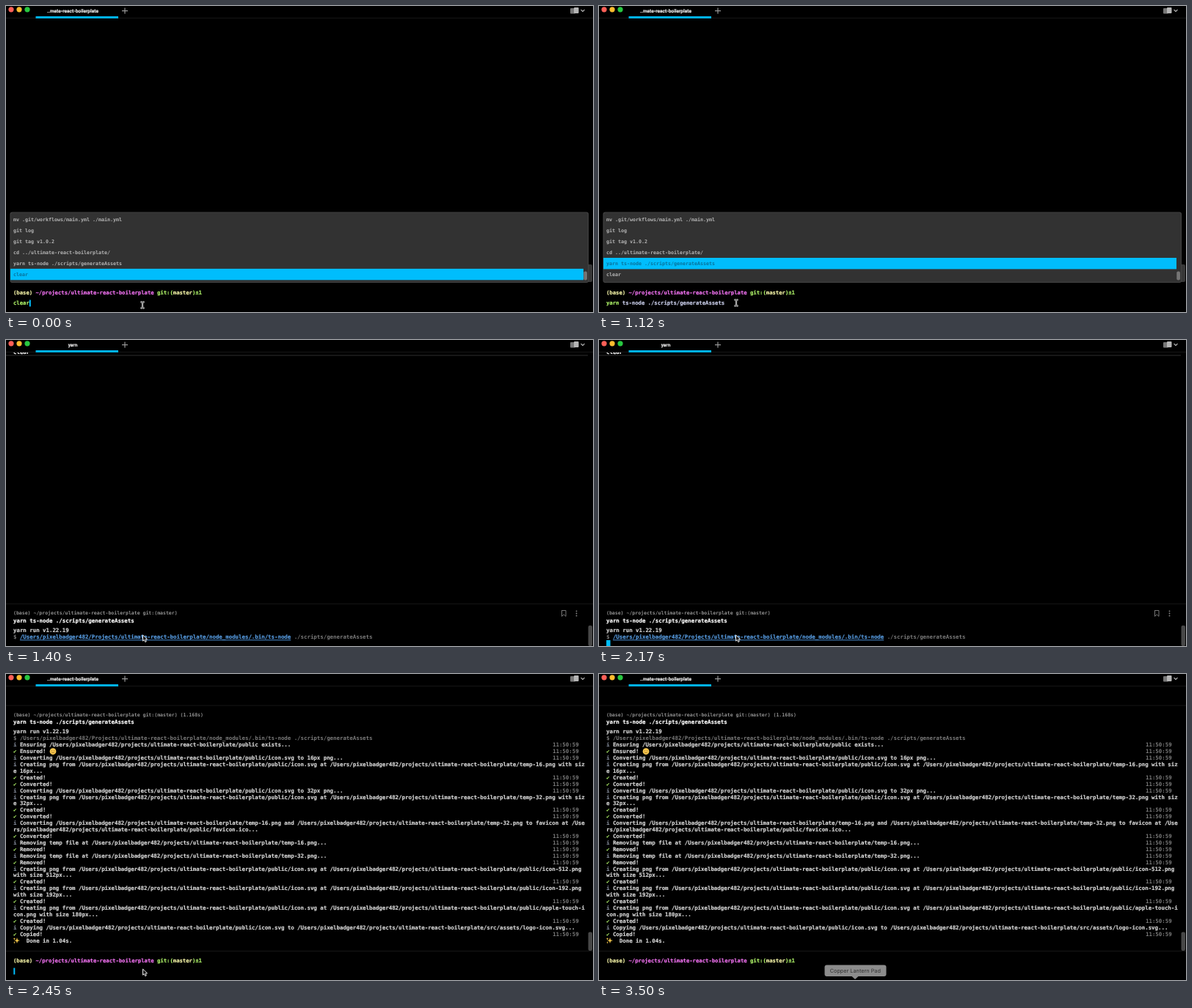
Write an HTML page with a canvas that moves like this. It is 800 by 418 pixels and loops after 3710 ms.

```html
<!DOCTYPE html>
<html lang="en">
<head>
<meta charset="utf-8">
<title>Terminal</title>
<style>
  html, body { margin: 0; width: 100%; height: 100%; overflow: hidden; background: #000; }
  canvas { display: block; }
</style>
</head>
<body>
<canvas id="stage" width="800" height="418"></canvas>
<script>
const ctx = document.getElementById('stage').getContext('2d');
const LOOP = 3710, LEFT = 10, COLS = 175, CHAR = 4.457, ROW = 8.91;
const SIZE = { output: 7.4, input: 7.24, head: 6.53, menu: 6.65 };
const BLUE = '#00bdfc', GREEN = '#aef268', YELLOW = '#f3f2a6', PINK = '#ee70ee';
const TEXT = '#d2d2d2', DIM = '#7a7a7a', RULE = '#161616';
const COMMAND = 'yarn ts-node ./scripts/generateAssets';
const PROMPT = '(base) ~/projects/ultimate-react-boilerplate git:(master)';
const HISTORY = ['mv .git/workflows/main.yml ./main.yml', 'git log', 'git tag v1.0.2',
  'cd ../ultimate-react-boilerplate/', COMMAND, 'clear'];

// Terminal output, wrapped to the column count
const home = '/Users/pixelbadger482/projects/ultimate-react-boilerplate';
const svg = home + '/public/icon.svg';
const bin = home.replace('projects', 'Projects') + '/node_modules/.bin/ts-node';
const temp = s => `${home}/temp-${s}.png`;
const create = (file, s) => [`i Creating png from ${svg} at ${home}/${file} with size ${s}px...`, '✔ Created!'];
const convert = s => [`i Converting ${svg} to ${s}px png...`, ...create(`temp-${s}.png`, s), '✔ Converted!'];
const remove = s => [`i Removing temp file at ${temp(s)}...`, '✔ Removed!'];
const rows = [
  'yarn run v1.22.19',
  `$ ${bin} ./scripts/generateAssets`,
  `i Ensuring ${home}/public exists...`, '✔ Ensured!',
  ...convert(16), ...convert(32),
  `i Converting ${temp(16)} and ${temp(32)} to favicon at ${home}/public/favicon.ico...`, '✔ Converted!',
  ...remove(16), ...remove(32),
  ...create('public/icon-512.png', 512),
  ...create('public/icon-192.png', 192),
  ...create('public/apple-touch-icon.png', 180),
  `i Copying ${svg} to ${home}/src/assets/logo-icon.svg...`, '✔ Copied!',
  '    Done in 1.04s.'
].flatMap(line => line.length <= COLS ? [line] : [line.slice(0, COLS), line.slice(COLS).trimStart()]);

function rect(x, y, w, h, color) {
  ctx.fillStyle = color;
  ctx.fillRect(x, y, w, h);
}

function round(x, y, w, h, r, color) {
  ctx.fillStyle = color;
  ctx.beginPath();
  ctx.roundRect(x, y, w, h, r);
  ctx.fill();
}

function disc(x, y, r, color) {
  round(x - r, y - r, 2 * r, 2 * r, r, color);
}

function path(points, fill, stroke, width = 1) {
  ctx.beginPath();
  points.forEach(([x, y]) => ctx.lineTo(x, y));
  if (fill) { ctx.closePath(); ctx.fillStyle = fill; ctx.fill(); }
  if (stroke) { ctx.strokeStyle = stroke; ctx.lineWidth = width; ctx.stroke(); }
}

// A hairline stroke thickens the small letters
function ink(text, x, y, color, stroke) {
  ctx.fillStyle = ctx.strokeStyle = color;
  ctx.lineWidth = stroke;
  ctx.fillText(text, x, y);
  if (stroke) ctx.strokeText(text, x, y);
}

// Draws text centred vertically on y and returns its right end
function mono(text, x, y, size, color, stroke = 0.2) {
  ctx.font = `bold ${size}px "DejaVu Sans Mono", monospace`;
  ink(text, x, y + 2.4, color, stroke);
  return x + ctx.measureText(text).width;
}

function label(text, x, y, font, color, stroke = 0) {
  ctx.font = font;
  ctx.textAlign = 'center';
  ink(text, x, y + 2.5, color, stroke);
  ctx.textAlign = 'left';
}

const spans = (parts, x, y, size) =>
  parts.reduce((at, [text, color]) => mono(text, at, y, size, color), x);

function tabBar(title) {
  rect(0, 0, 800, 16, '#000');
  rect(0, 16, 800, 1, RULE);
  ['#ff5f57', '#febc2e', '#28c840'].forEach((c, i) => disc(7 + 11 * i, 4.8, 3.6, c));
  label(title, 91, 6.8, 'bold 6.5px Roboto, sans-serif', '#eee', 0.2);
  rect(40.5, 14, 112.5, 3, '#00b2ee');
  rect(158, 6, 8, 1.2, '#999');
  rect(161.4, 2.6, 1.2, 8, '#999');
  round(769, 3, 7, 7.5, 1, '#777');
  round(774, 2, 6.5, 8, 1, '#b5b5b5');
  path([[783.5, 5], [786, 7.5], [788.5, 5]], null, '#aaa', 1.1);
}

function prompt() {
  spans([['(base) ', YELLOW], ['~/projects/ultimate-react-boilerplate', PINK],
    [' git:(', GREEN], ['master', YELLOW], [')±1', GREEN]], LEFT, 391.3, SIZE.input);
}

function menu(t) {
  const picked = t < 280 ? 5 : 4;
  round(791, 353, 8, 24, 2, '#383838');
  round(5.5, 281.5, 788.5, 96.5, 3, '#4a4a4a');
  round(6.3, 282.3, 787, 95, 2.5, '#323232');
  HISTORY.forEach((text, i) => {
    const y = 292 + 14.9 * i;
    if (i === picked) rect(6, y - 7.6, 781, 15.4, BLUE);
    mono(text, LEFT, y, SIZE.menu, i === picked ? '#08729b' : '#b4b4b4', 0);
  });
  round(787.3, 362.5, 4.7, 12, 2, '#757575');
  prompt();
  const end = picked === 5
    ? mono('clear', LEFT, 405.3, SIZE.input, GREEN)
    : spans([['yarn', GREEN], [COMMAND.slice(4), '#c6cae6']], LEFT, 405.3, SIZE.input);
  if (t < 630) rect(end, 401.5, 2, 9, BLUE);
}

function block(top, count, done) {
  rect(0, top - 36.5, 800, 1, RULE);
  mono(PROMPT + (done ? ' (1.168s)' : ''), LEFT, top - 23.5, SIZE.head, '#909090', 0);
  mono(COMMAND, LEFT, top - 13, SIZE.output, '#fff');
  if (!done) {
    const y = top - 23;
    path([[757.5, y - 4], [763, y - 4], [763, y + 4], [760.2, y + 1.5], [757.5, y + 4], [757.5, y - 4.4]], null, '#777');
    [-3.2, 0, 3.2].forEach(d => disc(777.5, y + d, 0.9, '#888'));
  }
  rows.slice(0, count).forEach((text, i) => {
    const y = top + i * ROW;
    if (i === 1) return commandLine(y, count === 2);
    const mark = /^[i✔] /.test(text);
    if (mark) {
      const tick = text[0] === '✔';
      mono(text[0], LEFT, y, SIZE.output, tick ? GREEN : '#8a92a2', 0);
      mono(text.slice(2), LEFT + 2 * CHAR, y, SIZE.output, TEXT);
      if (text.length < 120) mono('11:50:59', 745, y, SIZE.output, DIM, 0);
    } else mono(text, LEFT, y, SIZE.output, TEXT);
    if (text.includes('Ensured')) smiley(64, y);
    if (text.includes('Done')) sparkle(14, y);
  });
}

function commandLine(y, hover) {
  const from = LEFT + 2 * CHAR;
  mono('$', LEFT, y, SIZE.output, DIM, 0);
  const end = mono(bin, from, y, SIZE.output, hover ? '#5598dc' : DIM, hover ? 0.2 : 0);
  if (hover) rect(from, y + 4, end - from, 1, '#4c8fd4');
  mono(' ./scripts/generateAssets', end, y, SIZE.output, DIM, 0);
}

function smiley(x, y) {
  disc(x, y, 4.4, '#f6c64e');
  disc(x - 1.5, y - 1, 0.5, '#8a5c1c');
  disc(x + 1.5, y - 1, 0.5, '#8a5c1c');
  path([[x - 2, y + 1.2], [x, y + 2.2], [x + 2, y + 1.2]], null, '#8a5c1c', 0.7);
}

function sparkle(x, y) {
  const star = (cx, cy, r) => path([...Array(8).keys()].map(i => {
    const a = i * Math.PI / 4, d = i % 2 ? r * 0.35 : r;
    return [cx + d * Math.sin(a), cy - d * Math.cos(a)];
  }), '#f5c84a');
  star(x + 1, y, 4);
  star(x - 2.6, y - 2.4, 1.8);
  star(x - 2.4, y + 2.8, 1.6);
}

function running(t) {
  const count = t < 2240 ? 2 : t < 2310 ? 14 : t < 2380 ? 23 : 29;
  const bottom = 414.3;
  mono('clear', LEFT, 16.6, SIZE.output, '#fff');
  rect(0, 20.5, 793, 1, '#2e2e2e');
  block(bottom - count * ROW, count, false);
  if (t >= 2030) rect(LEFT, bottom - 4.3, 5.5, 9, BLUE);
  round(793.5, 390, 5.5, 28, 2, '#484848');
}

function finished(t) {
  block(79, rows.length, true);
  rect(0, 378, 800, 1, RULE);
  round(793.5, 352.5, 5.5, 25.5, 2, '#484848');
  prompt();
  if (t < 2940) rect(10.3, 401.5, 2, 9, BLUE);
}

function iBeam(x, y) {
  const beam = [[[x - 2.5, y - 4.5], [x, y - 3.5], [x + 2.5, y - 4.5]], [[x, y - 3.5], [x, y + 3.5]],
    [[x - 2.5, y + 4.5], [x, y + 3.5], [x + 2.5, y + 4.5]]];
  beam.forEach(p => path(p, null, '#eee', 2.2));
  beam.forEach(p => path(p, null, '#222', 0.7));
}

function arrow(x, y) {
  path([[0, 0], [0, 8.2], [1.9, 6.5], [3.2, 9.6], [4.8, 8.9], [3.5, 6], [6, 5.8], [0, 0]]
    .map(([dx, dy]) => [x + dx, y + dy]), '#111', '#e8e8e8', 1);
}

function pointer(t) {
  if (t < 1260) return iBeam(t < 280 ? 186 : 187, t < 280 ? 408.5 : 405.5);
  const p = Math.min(1, Math.max(0, (t - 2660) / 350));
  const ease = p * p * (3 - 2 * p);
  arrow(186.5 + 162 * ease, 403 + 17 * ease);
}

function tooltip() {
  round(307.5, 397.5, 84, 15.5, 3, '#8c8c8c');
  path([[344.5, 413], [353.5, 413], [349, 417]], '#8c8c8c');
  label('Copper Lantern Pad', 349.3, 405.2, '7.3px Inter, sans-serif', '#303030');
}

function draw(t) {
  ctx.textRendering = 'geometricPrecision';
  ctx.lineJoin = 'round';
  rect(0, 0, 800, 418, '#000');
  const busy = t >= 1260 && t < 2450;
  if (t < 1260) menu(t);
  else if (busy) running(t);
  else finished(t);
  tabBar(busy ? 'yarn' : '..mate-react-boilerplate');
  pointer(t);
  if (t >= 3150) tooltip();
}

const start = performance.now();
function tick() {
  draw((performance.now() - start) % LOOP);
  requestAnimationFrame(tick);
}
tick();
</script>
</body>
</html>
```
